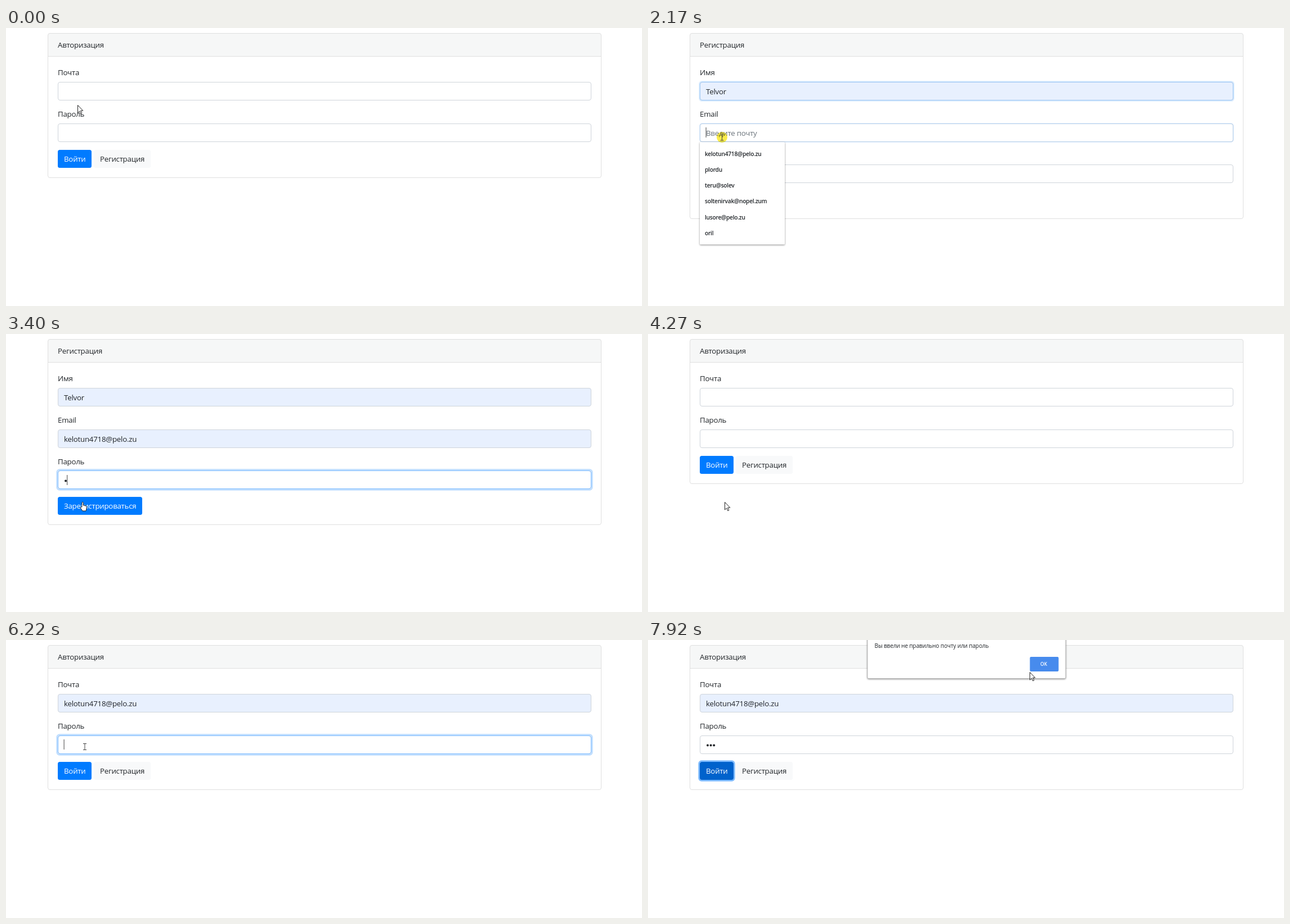
An HTML page for the animation above (8 s loop, 1130 by 495 pixels).

```html
<!DOCTYPE html>
<html lang="ru">
<head>
<meta charset="utf-8">
<style>
  html, body { margin: 0; width: 100%; height: 100%; overflow: hidden; background: #fff; }
  svg { display: block; width: 100vw; height: 100vh; }
  text { font: 13.3px "Open Sans", "Noto Sans", sans-serif; letter-spacing: -.25px; fill: #212529; }
  .hint { fill: #6c757d; }
  .light { fill: #fff; }
  .row { font-size: 10.2px; font-weight: 600; letter-spacing: -.25px; }
  .small { font-size: 10px; letter-spacing: -.1px; }
  .ok { font-size: 8.5px; font-weight: 600; fill: #fff; letter-spacing: 0; }
  .popup { filter: drop-shadow(0 1px 1.5px #0007); }
  .click { fill: #fbec4b; mix-blend-mode: multiply; }
</style>
</head>
<body>
<svg id="stage" viewBox="0 0 1130 495"></svg>
<script>
const LOOP = 8000, MOVE = 330;
const NAME = 'Telvor', EMAIL = 'kelotun4718@pelo.zu';
const EMAILS = [EMAIL, 'plordu', 'teru@solev', 'soltenirvak@nopel.zum', 'lusore@pelo.zu', 'oril'];

// The pointer arrives at a spot, waits, then clicks
const stop = (arrive, x, y, wait = 100) => ({ arrive, x, y, click: arrive + wait });
const ACTS = {
  rest: stop(0, 127, 137, Infinity),
  signUp: stop(390, 203, 232),
  name: stop(1150, 136, 122),
  pickName: stop(1600, 134, 149),
  email: stop(2010, 131, 186),
  pickEmail: stop(2390, 133, 222),
  password: stop(2780, 137, 262),
  submit: stop(3390, 136, 299, 550),
  loginEmail: stop(4780, 137, 124),
  pickLogin: stop(5340, 137, 147, 250),
  loginPassword: stop(5880, 140, 190),
  enter: stop(6900, 125, 232, 250),
  dismiss: stop(7900, 678, 57, Infinity)
};
const PATH = Object.values(ACTS);

const SIGN_UP_PAGE = { from: ACTS.signUp.click + 90, to: ACTS.submit.click + 160 };
const ALERT_AT = ACTS.enter.click + 230;
const POPUPS = [
  { top: 129, rows: [NAME], field: ACTS.name, pick: ACTS.pickName },
  { top: 203, rows: EMAILS, field: ACTS.email, pick: ACTS.pickEmail },
  { top: 129, rows: EMAILS, field: ACTS.loginEmail, pick: ACTS.pickLogin }
];

const within = (v, a, b) => v >= a && v < b;
const ease = v => { const p = Math.max(0, Math.min(1, v)); return p * p * (3 - 2 * p); };
const focus = (t, on, off) => ease((t - on.click) / 150) - ease((t - off.click) / 150);
const typed = (t, start) => Math.max(0, Math.min(3, Math.floor((t - start) / 85) + 1));
const fieldTop = index => Math.round(96 + index * 73.7);
const openPopup = t => POPUPS.find(p => within(t, p.field.click, p.pick.click));

function pointerAt(t) {
  let { x, y } = PATH[0];
  PATH.slice(1).forEach((act, i) => {
    const previous = PATH[i];
    const start = Math.max(act.arrive - MOVE, previous.arrive + 60);
    const p = ease((t - start) / (act.arrive - start));
    x += (act.x - previous.x) * p;
    y += (act.y - previous.y) * p;
  });
  return [x, y];
}

const rect = (x, y, w, h, fill, rest = '') =>
  `<rect x="${x}" y="${y}" width="${w}" height="${h}" fill="${fill}" ${rest}/>`;
const text = (x, y, content, kind = '') => `<text x="${x}" y="${y}" class="${kind}">${content}</text>`;

// Glow that grows outwards from a box as its strength goes from 0 to 1
function glow(x, y, w, h, strength, opacity) {
  const size = strength * 2.7;
  return rect(x - size / 2, y - size / 2, w + size, h + size, 'none',
    `rx="4.5" stroke="#007bff" stroke-width="${size}" stroke-opacity="${strength * opacity}"`);
}

function card(title, height) {
  return '<path d="M74.5 50.5V13a3.5 3.5 0 0 1 3.5-3.5H1054a3.5 3.5 0 0 1 3.5 3.5V50.5Z" fill="#f6f7f7"/>' +
    '<path d="M75 50.5H1057" stroke="#dfdfdf"/>' +
    rect(74.5, 9.5, 983, height, 'none', 'rx="3.5" stroke="#dfdfdf"') + text(92, 35, title);
}

function field(index, label, { value = '', hint = '', ring = 0, dots = 0, caretAge = 0 }) {
  const y = fieldTop(index), baseline = 118 + index * 74;
  let out = text(92, baseline - 34, label) + glow(92, y, 948, 33, ring, .25) +
    rect(92.5, y + .5, 947, 32, value ? '#e8f0fe' : '#fff', 'rx="3.5" stroke="#ced4da"') +
    rect(92.5, y + .5, 947, 32, 'none', `rx="3.5" stroke="#80bdff" stroke-opacity="${ring}"`);
  if (value) out += text(103, baseline, value);
  else if (hint && !dots) out += text(103, baseline, hint, 'hint');
  for (let i = 0; i < dots; i++)
    out += `<circle cx="${106 + i * 5.6}" cy="${baseline - 4.5}" r="2" fill="#212529"/>`;
  if (!value && ring > 0 && caretAge % 1000 < 500)
    out += rect(102.6 + dots * 5.6, baseline - 15, 1, 18, '#444');
  return out;
}

function button(x, y, w, label, fill, kind, ring = 0) {
  return glow(x, y, w, 32, ring, .5) + rect(x, y, w, 32, fill, 'rx="3.5"') + text(x + 11, y + 21, label, kind);
}

function mainButton(t, y, w, label, act) {
  const pressed = t >= act.click;
  const fill = pressed ? '#0062cc' : t >= act.arrive + 50 ? '#0069d9' : '#007bff';
  return button(92, y, w, label, fill, 'light', pressed ? ease((t - act.click) / 150) : 0);
}

function suggestions({ top, rows, pick }, t) {
  const single = rows.length === 1;
  let out = `<g class="popup">${rect(92, top, 151, single ? 73.5 : 182.5, '#fff', 'rx="1.5"')}</g>`;
  if (t >= pick.arrive) out += rect(92, top + 7, 151, 28, '#eee');
  rows.forEach((row, i) => out += text(101, top + 24.7 + i * 28.2, row, 'row'));
  if (single) out += rect(92, top + 41, 151, 1, '#dcdcdc') + text(101, top + 61.5, 'Управление...', 'small');
  return out;
}

function registration(t) {
  const { name, pickName, email, pickEmail, password, submit } = ACTS;
  const dots = typed(t, submit.arrive);
  return card('Регистрация', 330) +
    field(0, 'Имя', { value: t >= pickName.arrive ? NAME : '', hint: 'Введите имя',
      ring: focus(t, name, email), caretAge: t - name.click }) +
    field(1, 'Email', { value: t >= pickEmail.arrive ? EMAIL : '', hint: 'Введите почту',
      ring: focus(t, email, password), caretAge: t - email.click }) +
    field(2, 'Пароль', { hint: 'Введите пароль', dots,
      ring: focus(t, password, submit), caretAge: t - (dots ? submit.arrive : password.click) }) +
    mainButton(t, 290, 150, 'Зарегистрироваться', submit);
}

function login(t) {
  const { signUp, loginEmail, pickLogin, loginPassword, enter } = ACTS;
  const typingStart = loginPassword.click + 400, dots = typed(t, typingStart);
  const overSignUp = within(t, signUp.arrive, SIGN_UP_PAGE.from);
  return card('Авторизация', 257) +
    field(0, 'Почта', { value: t >= pickLogin.arrive ? EMAIL : '',
      ring: focus(t, loginEmail, loginPassword), caretAge: t - loginEmail.click }) +
    field(1, 'Пароль', { dots, ring: focus(t, loginPassword, enter),
      caretAge: t - (dots ? typingStart : loginPassword.click) }) +
    mainButton(t, 217, 60, 'Войти', enter) +
    button(156, 217, 101, 'Регистрация', overSignUp ? '#e2e6ea' : '#f8f9fa');
}

function alertBox() {
  return `<g class="popup">${rect(390, -10, 352, 78.5, '#fff', 'rx="2" stroke="#aaa" stroke-width=".7"')}</g>` +
    text(402.5, 14.3, 'Вы ввели не правильно почту или пароль', 'small') +
    rect(678.5, 30, 51, 26, '#478bed', 'rx="2"') + text(697, 46, 'OK', 'ok');
}

const POINTERS = {
  arrow: '<path d="M.5 .5V14L3.6 11 5.8 15.8 7.9 14.8 5.7 10.2H9.8Z" fill="#fff" stroke="#222"/>',
  beam: '<path d="M-3-5.5H3M0-5.5V5.5M-3 5.5H3" fill="none" stroke="#444"/>',
  hand: '<path d="M-1 9V1.5a1.2 1.2 0 0 1 2.4 0V6l5 1.2a1.7 1.7 0 0 1 1.2 1.8L6.8 13 6 16H0L-3.6 10.8a1.2 1.2 0 0 1 1.8-1.5Z" fill="#fff" stroke="#222"/>'
};

function pointerKind(t, x, y, signingUp) {
  const popup = openPopup(t);
  if (popup && y > popup.top || t >= ALERT_AT) return 'arrow';
  const fields = signingUp ? [0, 1, 2] : [0, 1];
  if (fields.some(i => within(y, fieldTop(i), fieldTop(i) + 33))) return 'beam';
  const buttonTop = signingUp ? 290 : 217, buttonsRight = signingUp ? 242 : 257;
  return within(y, buttonTop, buttonTop + 32) && x < buttonsRight ? 'hand' : 'arrow';
}

function pointer(t, signingUp) {
  const [x, y] = pointerAt(t);
  const clicking = PATH.some(act => within(t, act.click, act.click + 150));
  return (clicking ? `<circle class="click" cx="${x}" cy="${y}" r="9.5"/>` : '') +
    `<g transform="translate(${x} ${y})">${POINTERS[pointerKind(t, x, y, signingUp)]}</g>`;
}

const stage = document.getElementById('stage');

function frame() {
  const t = performance.now() % LOOP;
  const signingUp = within(t, SIGN_UP_PAGE.from, SIGN_UP_PAGE.to);
  const popup = openPopup(t);
  stage.innerHTML = (signingUp ? registration(t) : login(t)) +
    (popup ? suggestions(popup, t) : '') +
    (t >= ALERT_AT ? alertBox() : '') + pointer(t, signingUp);
  requestAnimationFrame(frame);
}
frame();
</script>
</body>
</html>
```
